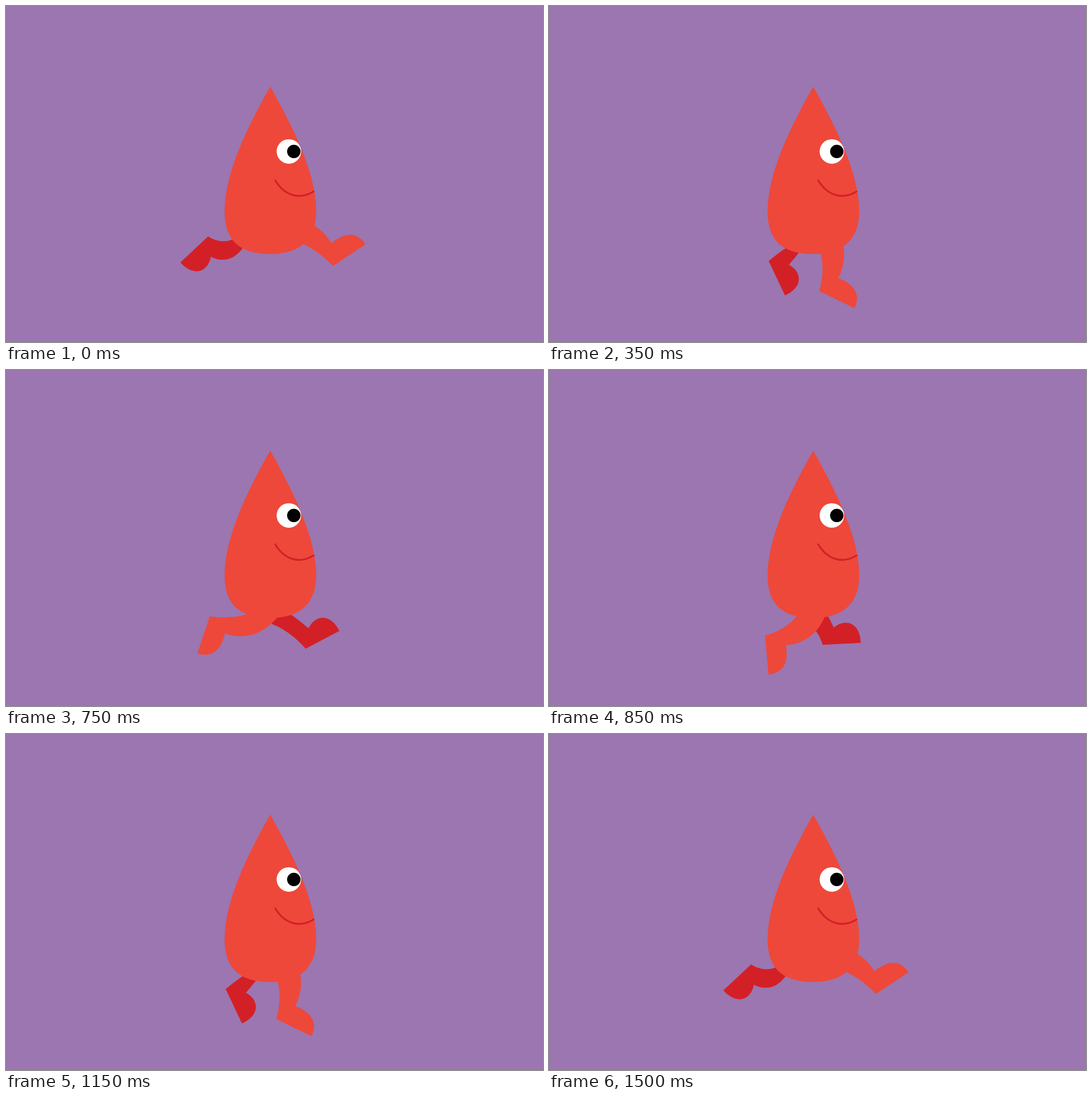
An HTML page with a canvas that plays this animation: 946x592 px, repeating every 1550 ms.

```html
<!DOCTYPE html>
<html lang="en">
<head>
<meta charset="utf-8">
<title>Running drop</title>
<style>
  html, body { margin: 0; width: 100%; height: 100%; overflow: hidden; background: #9b76b1; }
  canvas { display: block; }
</style>
</head>
<body>
<canvas id="stage" width="946" height="592"></canvas>
<script>
const ctx = document.getElementById('stage').getContext('2d');
const PURPLE = '#9b76b1', RED = '#ee483a', DARK = '#d32027';
const STEP = 50, STEPS = 31, HALF_STEPS = 15;
const BEND = 0.57; // how far each leg edge follows the shin before turning to the hip

// path: Bézier for the heel and the foot's angle, [x, y, degrees].
// Each edge runs from a gliding hip point to the heel or the ankle;
// lean tilts the shin away from the foot's upright.
const frontLeg = {
  color: RED,
  path: [[576, 458, -33.7], [532.4, 507.7, 9], [402.7, 535.1, 47.2], [359, 434, 108.4]],
  foot: { ankle: [20.3, -35], top: [51, -38], front: [69, -26], toe: [69, 0] },
  heelEdge: { from: [496, 410], to: [441, 424], lean: 0.18 },
  ankleEdge: { from: [524, 378], to: [490, 420], lean: 0 }
};
const backLeg = {
  color: DARK,
  path: [[356, 406, 136.8], [347, 429.3, 86], [405, 479, 35.7], [528, 491, -27.7]],
  foot: { ankle: [21, -29.5], top: [44, -46], front: [68, -34], toe: [67, 0] },
  heelEdge: { from: [418, 400], to: [445, 441], lean: 0.25 },
  ankleEdge: { from: [428, 408], to: [485, 420], lean: 0.4 }
};

const body = new Path2D(`M465.5 142 C425 213 385 295 385 362
  C385 415 414 437 465.5 437 C517 437 546.5 412 546.5 362
  C546.5 295 505.5 213 465.5 142 Z`);
const smile = new Path2D('M473.5 306 C490 334 517 343 543 326');

const mix = (a, b, k) => a.map((v, i) => v + (b[i] - v) * k);
const easeInOut = p => (1 - Math.cos(Math.PI * p)) / 2;

function alongPath(points, p) {
  while (points.length > 1) {
    points = points.slice(1).map((next, i) => mix(points[i], next, p));
  }
  return points[0];
}

function drawLeg({ color, path, foot, heelEdge, ankleEdge }, p) {
  const [x, y, degrees] = alongPath(path, p);
  const angle = degrees * Math.PI / 180;
  const cos = Math.cos(angle), sin = Math.sin(angle);
  const place = ([u, v]) => [x + u * cos - v * sin, y + u * sin + v * cos];

  function shapeEdge({ from, to, lean }, [u, v]) {
    const hip = mix(from, to, easeInOut(p));
    const end = place([u, v]);
    const reach = BEND * Math.hypot(hip[0] - end[0], hip[1] - end[1]);
    return { hip, end, bend: place([u - lean * reach, v - reach]) };
  }

  const heel = shapeEdge(heelEdge, [0, 0]);
  const ankle = shapeEdge(ankleEdge, foot.ankle);
  ctx.fillStyle = color;
  ctx.beginPath();
  ctx.moveTo(...heel.hip);
  ctx.quadraticCurveTo(...heel.bend, ...heel.end);
  ctx.lineTo(...place(foot.toe));
  ctx.bezierCurveTo(...place(foot.front), ...place(foot.top), ...ankle.end);
  ctx.quadraticCurveTo(...ankle.bend, ...ankle.hip);
  ctx.fill();
}

function disc(x, y, r, color) {
  ctx.fillStyle = color;
  ctx.beginPath();
  ctx.arc(x, y, r, 0, Math.PI * 2);
  ctx.fill();
}

function draw(p) {
  ctx.fillStyle = PURPLE;
  ctx.fillRect(0, 0, 946, 592);
  drawLeg(backLeg, p);
  ctx.fillStyle = RED;
  ctx.fill(body);
  drawLeg(frontLeg, p);
  disc(498.3, 256.3, 21.6, '#fff');
  disc(507, 256.3, 11.8, '#000');
  ctx.strokeStyle = DARK;
  ctx.lineWidth = 3.2;
  ctx.stroke(smile);
}

const start = performance.now();
function tick() {
  const step = Math.floor((performance.now() - start) / STEP) % STEPS;
  // The stride swings forth and back.
  draw(1 - Math.abs(1 - step / HALF_STEPS));
  requestAnimationFrame(tick);
}
tick();
</script>
</body>
</html>
```
